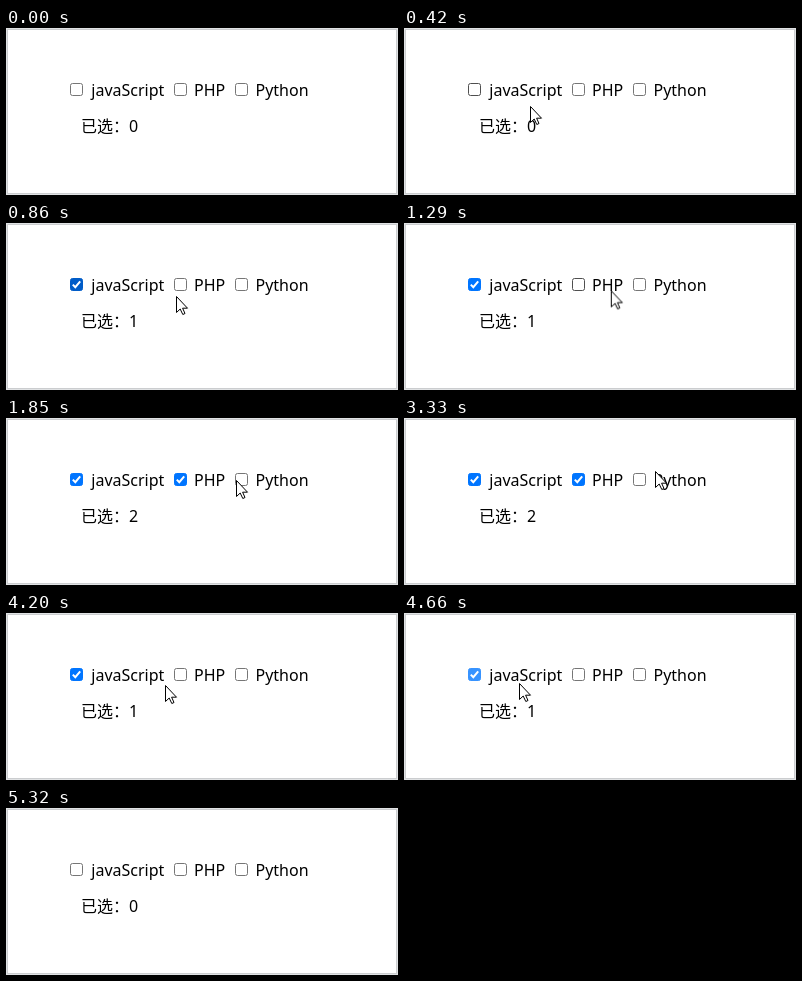
An HTML page for the animation above (5770 ms loop, 392x167 px).

```html
<!DOCTYPE html>
<html lang="zh-CN">
<head>
<meta charset="utf-8">
<title>Checkbox counter</title>
<style>
  html, body { margin: 0; width: 100%; height: 100%; overflow: hidden; background: #fff; }
  svg { display: block; width: 392px; height: 167px; }
  text { font: 16px "Noto Sans", "Noto Sans CJK SC", sans-serif; fill: #000; }
  .zh { font-family: "Noto Sans CJK SC", "Noto Sans CJK", sans-serif; }
  .frame { fill: none; }
  .box { fill: #fff; stroke: #767676; }
  .mark { fill: none; stroke: #fff; stroke-width: 2; }
  .box, .digits, .cursor { animation: 5770ms step-end infinite; }
  .js { animation-name: js; }
  .php { animation-name: php; }
  .py { animation-name: py; }
  .digits { animation-name: count; }
  .cursor { animation-name: move; }

  /* idle, hover, press, checked, hover off, and back */
  @keyframes js {
    0%, 88.388%, 100% { fill: #fff; stroke: #767676; }
    7.279%, 83.362% { fill: #fff; stroke: #4f4f4f; }
    11.265% { fill: #fff; stroke: #8d8d8d; }
    13.518%, 74.35% { fill: #005cc8; stroke: #005cc8; }
    15.771% { fill: #0075ff; stroke: #0075ff; }
    80.762% { fill: #3793ff; stroke: #3793ff; }
  }
  @keyframes php {
    0%, 71.057%, 100% { fill: #fff; stroke: #767676; }
    16.638%, 69.67% { fill: #fff; stroke: #4f4f4f; }
    23.223% { fill: #fff; stroke: #8d8d8d; }
    24.956%, 61.525% { fill: #005cc8; stroke: #005cc8; }
    29.462% { fill: #0075ff; stroke: #0075ff; }
    67.071% { fill: #3793ff; stroke: #3793ff; }
  }
  @keyframes py {
    0%, 56.845%, 100% { fill: #fff; stroke: #767676; }
    34.662%, 55.979% { fill: #fff; stroke: #4f4f4f; }
    44.887% { fill: #fff; stroke: #8d8d8d; }
    45.406% { fill: #005cc8; stroke: #005cc8; }
  }
  @keyframes count {
    0%, 83.362%, 100% { transform: translateY(0); }
    13.518%, 69.67% { transform: translateY(-20px); }
    24.956%, 55.979% { transform: translateY(-40px); }
    45.406% { transform: translateY(-60px); }
  }
  @keyframes move {
    0%, 92.2%, 100% { transform: translate(132px, 200px); }
    1.559% { transform: translate(132px, 145px); animation-timing-function: steps(3); }
    4.159% { transform: translate(129px, 103px); animation-timing-function: steps(4); }
    6.932% { transform: translate(126px, 78px); animation-timing-function: steps(4); }
    9.705%, 11.265% { transform: translate(125px, 70px); }
    13.518% { transform: translate(130px, 70px); animation-timing-function: steps(2); }
    14.904% { transform: translate(170px, 73px); animation-timing-function: steps(10); }
    23.223%, 24.956% { transform: translate(216px, 66px); }
    27.729% { transform: translate(216px, 66px); animation-timing-function: steps(5); }
    32.062% { transform: translate(230px, 62px); animation-timing-function: steps(3); }
    34.662% { transform: translate(255px, 60px); animation-timing-function: steps(7); }
    42.287% { transform: translate(279px, 66px); }
    44.887% { transform: translate(280px, 66px); }
    55.979% { transform: translate(280px, 66px); animation-timing-function: steps(2); }
    57.712% { transform: translate(251px, 53px); animation-timing-function: steps(7); }
    63.084% { transform: translate(191px, 66px); }
    69.67% { transform: translate(191px, 66px); animation-timing-function: steps(4); }
    72.79% { transform: translate(159px, 72px); animation-timing-function: steps(8); }
    79.029% { transform: translate(115px, 70px); }
    86.481% { transform: translate(115px, 70px); animation-timing-function: steps(6); }
    91.334% { transform: translate(138px, 152px); }
  }
</style>
</head>
<body>
<svg viewBox="0 0 392 167">
  <defs>
    <path id="mark" class="mark" d="M2.8 6.6 5.3 9.2 10.2 3.4"/>
    <clipPath id="slot"><rect x="121" y="88" width="16" height="19"/></clipPath>
  </defs>
  <rect class="frame" x=".5" y=".5" width="391" height="166" stroke="#e0e2e4"/>
  <rect class="frame" x="1.5" y="1.5" width="389" height="164" stroke="#cbcdcf"/>

  <g transform="translate(64 55)">
    <rect class="box js" x=".5" y=".5" width="12" height="12" rx="2"/><use href="#mark"/>
  </g>
  <text x="85.3" y="68">javaScript</text>
  <g transform="translate(168 55)">
    <rect class="box php" x=".5" y=".5" width="12" height="12" rx="2"/><use href="#mark"/>
  </g>
  <text x="188" y="68">PHP</text>
  <g transform="translate(229 55)">
    <rect class="box py" x=".5" y=".5" width="12" height="12" rx="2"/><use href="#mark"/>
  </g>
  <text x="249.5" y="68">Python</text>

  <text class="zh" x="75" y="104">已选：</text>
  <g clip-path="url(#slot)">
    <g class="digits">
      <text x="123" y="104">0</text>
      <text x="123" y="124">1</text>
      <text x="123" y="144">2</text>
      <text x="123" y="164">3</text>
    </g>
  </g>

  <path class="cursor" d="M.5 .5V16.5L4.2 13 6.8 18.5 9 17.5 6.6 12.2H11.5Z" fill="#fff" stroke="#000"/>
</svg>
</body>
</html>
```
